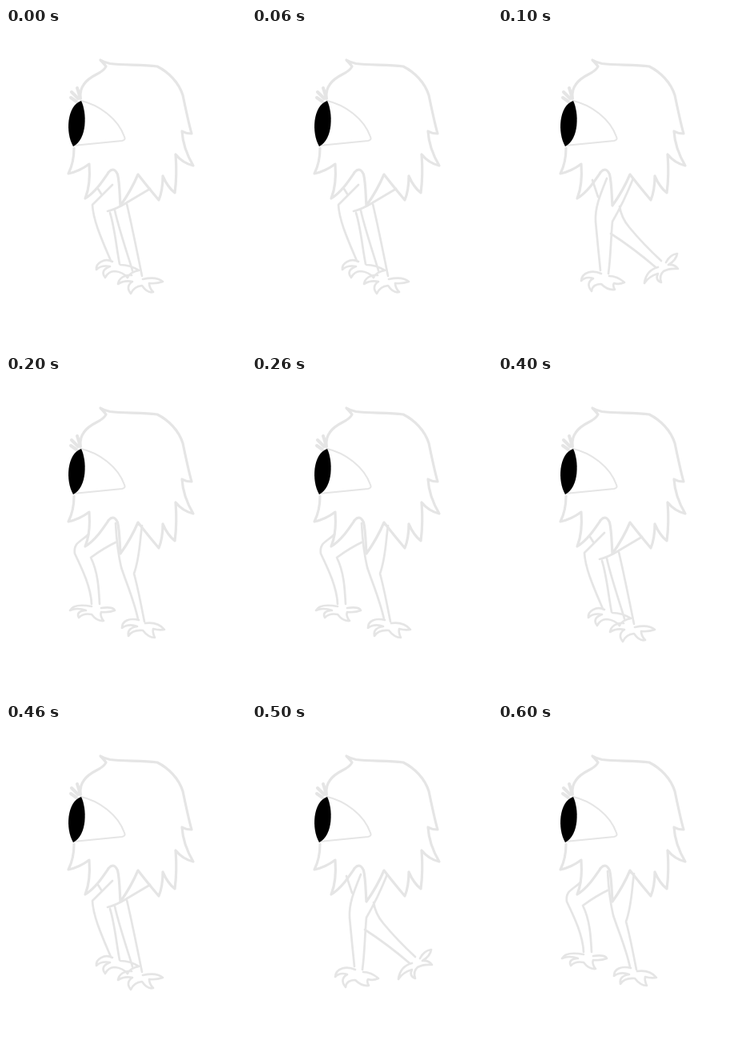
Write an HTML page that moves like this. It is 300 px wide and 400 px high and loops after 700 ms.

```html
<!DOCTYPE html>
<html>
<head>
<meta charset="utf-8">
<style>
  html, body { margin: 0; width: 100%; height: 100%; overflow: hidden; background: #fff; }
  svg { display: block; width: 300px; height: 400px; }
  .line { fill: none; stroke: #e5e5e5; stroke-width: 3.2; stroke-linecap: round; stroke-linejoin: round; }
  .thin { stroke-width: 2; }
  .leg { stroke-width: 2.7; }
  .lash { stroke-width: 4; }
</style>
</head>
<body>
<svg viewBox="0 0 300 400">
  <g id="body" class="line">
    <path d="M93 86C92 72 103 63 113 58Q123 53 125 48Q122 44 118 40Q123 43 130 44.5C148 47 170 45 189 48C203 55 216 68 221 84C224 98 228 118 232 132Q225 132 220 129C221 147 227 160 234 172Q221 169 212 158Q214 184 211 206Q202 199 196 185Q196 203 191 215Q179 201 165 183Q156 204 143 222C142 207 142 193 139.5 183Q135 173 128.5 180C121 191 112 205 99 213Q106 196 104 170Q92 179 78 182Q85 168 85 150"/>
    <path class="lash" d="M93 88L89 75M90 88L82 80M88 92L81 87"/>
    <path class="thin" d="M94 91C116 96 140 113 148 136Q150 140 145 141L84 147"/>
    <path d="M94 91C101 105 102 139 84 148C74 131 76 97 94 91Z" fill="#000" stroke="none"/>
  </g>
  <path id="legs" class="line leg"/>
</svg>
<script>
  const STEP = 100;
  const poses = {
    contact: {
      shift: 0,
      legs: "M115 201L120 209M133 196L108 221C109 241 120 265 131 291M180 201L148 220Q136 227 127 229M130 231C136 250 138 275 142 295M136 228C140 247 150 277 158 303M151 220C158 250 164 280 170 310",
      near: "M133 292C123 287 112 294 113 302Q119 296 130 298Q117 303 124 312Q128 304 136 304Q146 305 152 312Q155 305 166 303Q155 296 143 296",
      far: "M157 309C148 308 141 313 140 320Q148 315 158 317Q149 323 156 332Q160 323 170 322Q177 332 184 330Q179 325 179 319Q188 320 196 317Q188 310 171 314"
    },
    cross: {
      shift: 0,
      legs: "M118 190L125 211M136 188C128 208 121 224 122 242Q125 274 128 303M169 188Q157 218 143 242C141 263 141 286 138 307M152 223Q154 237 164 249C178 266 190 278 204 291M141 257Q169 275 197 299",
      near: "M129 307C118 302 105 305 104 316Q110 310 119 313Q109 319 117 329Q118 320 129 320Q137 328 146 327Q143 322 145 319Q151 321 158 318Q149 310 139 310",
      far: "M210 293Q215 283 224 282Q223 290 213 296Q221 295 225 301Q214 300 207 304Q201 309 204 318Q196 315 200 307Q189 310 183 319Q185 303 200 299"
    },
    lift: {
      shift: 0,
      legs: "M103 198C94 207 84 208 86 222C96 243 106 264 107 285M139 207Q122 215 106 227C115 245 116 266 117 285M137 184C138 203 140 222 144 239C149 255 160 280 165 304M170 187C167 209 167 228 160 247C165 265 169 287 173 307",
      near: "M107 288C96 286 84 285 80 293Q89 289 100 293Q87 294 91 302Q97 296 107 298Q114 307 122 306Q117 300 119 295Q129 296 136 293Q134 288 119 290",
      far: "M166 305C154 302 145 306 145 315Q153 309 164 313Q151 315 153 325Q158 317 171 318Q178 327 186 327Q183 321 184 316Q191 318 198 317Q190 307 174 309"
    },
    stride: {
      shift: -4,
      legs: "M107 203Q105 223 109 241C121 260 124 281 127 301M130 184Q135 201 133 215C126 239 134 275 135 302M134 181Q138 201 139 222C148 240 151 253 164 261Q181 280 202 298M167 185Q170 212 171 247Q193 269 211 296",
      near: "M128 305C118 303 106 303 103 311Q110 308 119 310Q109 313 115 320Q119 313 131 315Q139 324 145 323Q142 317 144 313Q151 314 159 310Q150 305 137 306",
      far: "M210 296Q217 289 223 292Q228 289 235 290Q228 294 225 297Q228 302 229 306Q220 300 212 306Q202 308 203 319Q198 313 201 307Q191 309 188 318C184 307 190 300 203 299"
    }
  };
  const order = ["contact", "cross", "lift", "stride", "contact", "cross", "lift"];
  const body = document.getElementById("body");
  const legs = document.getElementById("legs");
  let shown = "";

  function draw(now) {
    const name = order[Math.floor(now / STEP) % order.length];
    if (name !== shown) {
      const pose = poses[name];
      body.setAttribute("transform", `translate(${pose.shift} 0)`);
      legs.setAttribute("d", pose.legs + pose.near + pose.far);
      shown = name;
    }
  }

  const start = performance.now();
  function tick() {
    draw(performance.now() - start);
    requestAnimationFrame(tick);
  }
  draw(0);
  requestAnimationFrame(tick);
</script>
</body>
</html>
```
